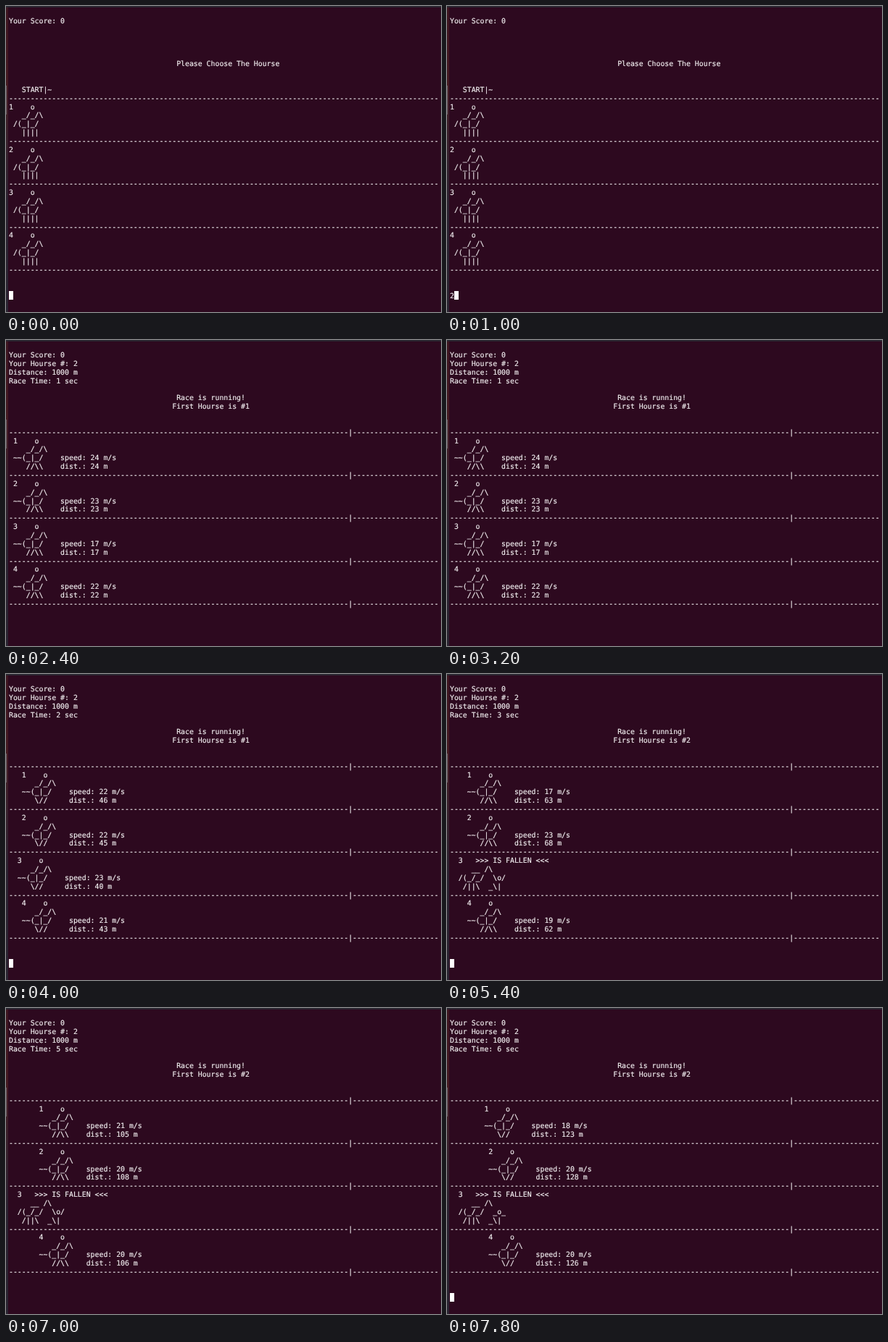
An HTML page that plays this animation: 600 px wide and 423 px high, repeating every 8000 ms.

```html
<!DOCTYPE html>
<html lang="en">
<head>
<meta charset="utf-8">
<title>Terminal race</title>
<style>
  html, body { margin: 0; width: 100%; height: 100%; overflow: hidden; background: #2d091f; }
  #stage { position: relative; width: 600px; height: 423px; overflow: hidden; background: #2d091f; }
  #top, #side, #screen, #cursor { position: absolute; }
  #top { left: 0; top: 0; width: 600px; height: 2px; background: #2a2630; }
  #side {
    left: 0; top: 2px; width: 3px; height: 421px;
    background: linear-gradient(#3d1520, #451a22 25%, #37202c 45%, #2b2230 65%, #2a2431);
  }
  #side::after {
    content: ""; position: absolute; left: 0; top: 108px;
    width: 1px; height: 40px; background: #6d5f68;
  }
  #screen {
    left: 4px; top: 16px; margin: 0; color: #f0ecee;
    font: 9.85px/11.86px "DejaVu Sans Mono", monospace;
    text-rendering: geometricPrecision; font-variant-ligatures: none;
    -webkit-text-stroke: 0.2px #f0ecee;
  }
  #cursor { width: 6px; height: 12px; background: #fff; }
</style>
</head>
<body>
<div id="stage">
  <div id="top"></div>
  <div id="side"></div>
  <pre id="screen"></pre>
  <div id="cursor"></div>
</div>
<script>
const LOOP = 8000, CELL_W = 5.93, CELL_H = 11.86;
const TYPED = 1000, ENTERED = 1400, BLINK = 600;
const TICKS = [2400, 3400, 4600, 5600, 6600, 7600];
const SPEEDS = [
  [24, 22, 17, 21, 21, 18],
  [23, 22, 23, 20, 20, 20],
  [17, 23],
  [22, 21, 19, 24, 20, 20]
];
const raw = String.raw;
const screenEl = document.getElementById("screen");
const cursorEl = document.getElementById("cursor");

const distance = (speeds, sec) => speeds.slice(0, sec).reduce((a, b) => a + b, 0);

function waitingHorse(number) {
  return [`${number}    o`, raw`   _/_/\ `, " /(_|_/", "   ||||"];
}

function racingHorse(speeds, index, sec) {
  const dist = distance(speeds, sec);
  const odd = sec % 2 === 1;
  const number = index + 1;
  const lines = sec > speeds.length
    ? [
        `${number}   >>> IS FALLEN <<<`,
        raw`   __ /\ `,
        "/(_/_/  " + (odd ? raw`\o/` : "_o_"),
        raw` /||\  _\|`
      ]
    : [
        `${number}    o`,
        raw`   _/_/\ `,
        `~~(_|_/    speed: ${speeds[sec - 1]} m/s`,
        (odd ? raw`   //\\` : raw`   \//`).padEnd(11) + `dist.: ${dist} m`
      ];
  const indent = " ".repeat(Math.floor(dist * 72 / 1000));
  return lines.map(line => indent + line);
}

function track(rule, horses) {
  return [rule, ...horses.flatMap(lines => [...lines, rule])];
}

function startScreen(typed) {
  return [
    "Your Score: 0", "", "", "", "",
    " ".repeat(39) + "Please Choose The Hourse", "", "",
    "   START|~",
    ...track("-".repeat(100), SPEEDS.map((_, i) => waitingHorse(i + 1))),
    "", "", typed ? "2" : ""
  ];
}

function raceScreen(sec) {
  const dists = SPEEDS.map(s => distance(s, sec));
  const first = dists.indexOf(Math.max(...dists)) + 1;
  const rule = "-".repeat(79) + "|" + "-".repeat(20);
  return [
    "Your Score: 0",
    "Your Hourse #: 2",
    "Distance: 1000 m",
    `Race Time: ${sec} sec`, "",
    " ".repeat(39) + "Race is running!",
    " ".repeat(38) + `First Hourse is #${first}`, "", "",
    ...track(rule, SPEEDS.map((s, i) => racingHorse(s, i, sec)))
  ];
}

function drawCursor(t, sec) {
  const col = t >= TYPED && t < ENTERED ? 1 : 0;
  const row = t >= ENTERED && !sec ? 33 : 32;
  const reset = t < TYPED ? 0 : t < ENTERED ? TYPED : ENTERED;
  const lit = Math.floor((t - reset) / BLINK) % 2 === 0;
  cursorEl.style.left = 4 + col * CELL_W + "px";
  cursorEl.style.top = Math.round(14.5 + row * CELL_H) + "px";
  cursorEl.style.visibility = lit ? "visible" : "hidden";
}

function draw(now) {
  const t = now % LOOP;
  const sec = TICKS.filter(tick => t >= tick).length;
  const text = (sec ? raceScreen(sec) : startScreen(t >= TYPED)).join("\n");
  if (screenEl.textContent !== text) screenEl.textContent = text;
  drawCursor(t, sec);
}

const began = performance.now();
function loop() {
  draw(performance.now() - began);
  requestAnimationFrame(loop);
}
loop();
</script>
</body>
</html>
```
